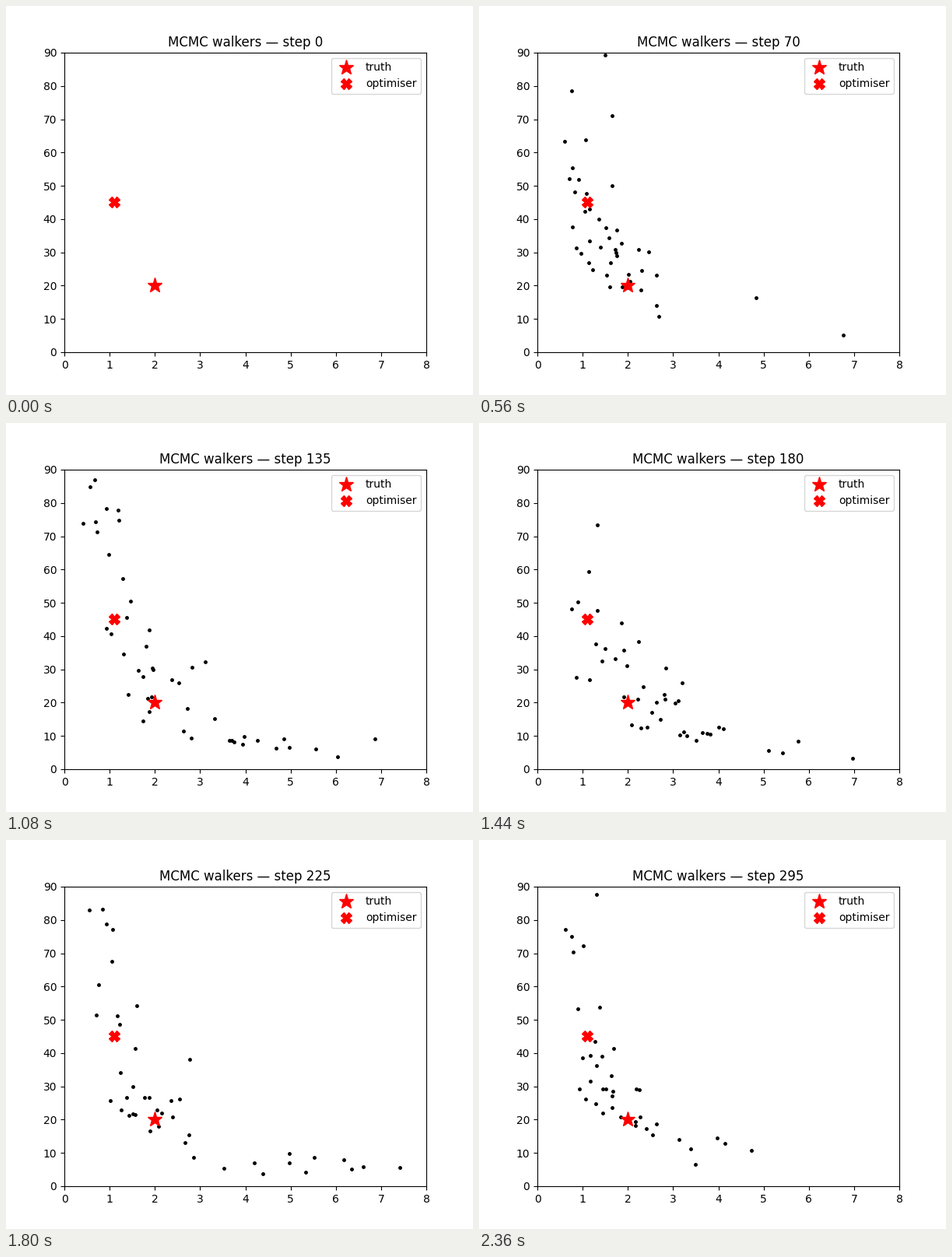
A matplotlib script that plays this animation: 600x500 px, repeating every 2400 ms.

```python
import numpy as np
import matplotlib.pyplot as plt
from matplotlib.animation import FuncAnimation

FRAMES, INTERVAL, STRIDE = 60, 40, 5
WALKERS = 50
TRUTH = (2, 20)
OPTIMUM = (1.1, 45)
NUDGE = 1e-5  # makes text and markers on half pixels round up and right


def log_prob(p):
    """Banana-shaped density: y falls roughly as 1/x, with log-normal scatter."""
    inside = (p > 0).all(axis=1)
    u, v = np.log(np.where(inside[:, None], p, 1)).T
    ridge = (v - 4.03 + 1.25 * u) / 0.37
    along = (u - 0.55) / 0.8
    return np.where(inside, -0.5 * (ridge**2 + along**2) - u - v, -np.inf)


def run_chain(steps, seed=7):
    """Affine-invariant stretch moves, updating each half from the other."""
    rng = np.random.default_rng(seed)
    pos = np.array(OPTIMUM) + 1e-4 * rng.standard_normal((WALKERS, 2))
    logp = log_prob(pos)
    chain = [pos.copy()]
    half = WALKERS // 2
    for _ in range(steps):
        order = rng.permutation(WALKERS)
        for active, other in ((order[:half], order[half:]),
                              (order[half:], order[:half])):
            z = (1 + rng.random(half)) ** 2 / 2
            partner = pos[rng.choice(other, half)]
            trial = partner + z[:, None] * (pos[active] - partner)
            trial_logp = log_prob(trial)
            gain = np.log(z) + trial_logp - logp[active]
            ok = np.log(rng.random(half)) < gain
            pos[active[ok]] = trial[ok]
            logp[active[ok]] = trial_logp[ok]
        chain.append(pos.copy())
    return chain


chain = run_chain((FRAMES - 1) * STRIDE)

fig, ax = plt.subplots(figsize=(6, 5), dpi=100)
fig.subplots_adjust(left=0.125 + NUDGE, right=0.9 + NUDGE,
                    bottom=0.11 + NUDGE, top=0.88 + NUDGE)
dots, = ax.plot([], [], "k.", ms=5)
ax.plot(*TRUTH, "r*", ms=14, label="truth", zorder=3)
ax.plot(*OPTIMUM, "rX", ms=10, label="optimiser", zorder=3)
ax.set_xlim(0, 8)
ax.set_ylim(0, 90)
ax.legend(loc="upper right")
title = ax.set_title("")


def update(frame):
    step = frame * STRIDE
    dots.set_data(*chain[step].T)
    title.set_text(f"MCMC walkers — step {step}")
    return dots, title


anim = FuncAnimation(fig, update, frames=FRAMES, interval=INTERVAL,
                     repeat=True, repeat_delay=0)
plt.show()
```
